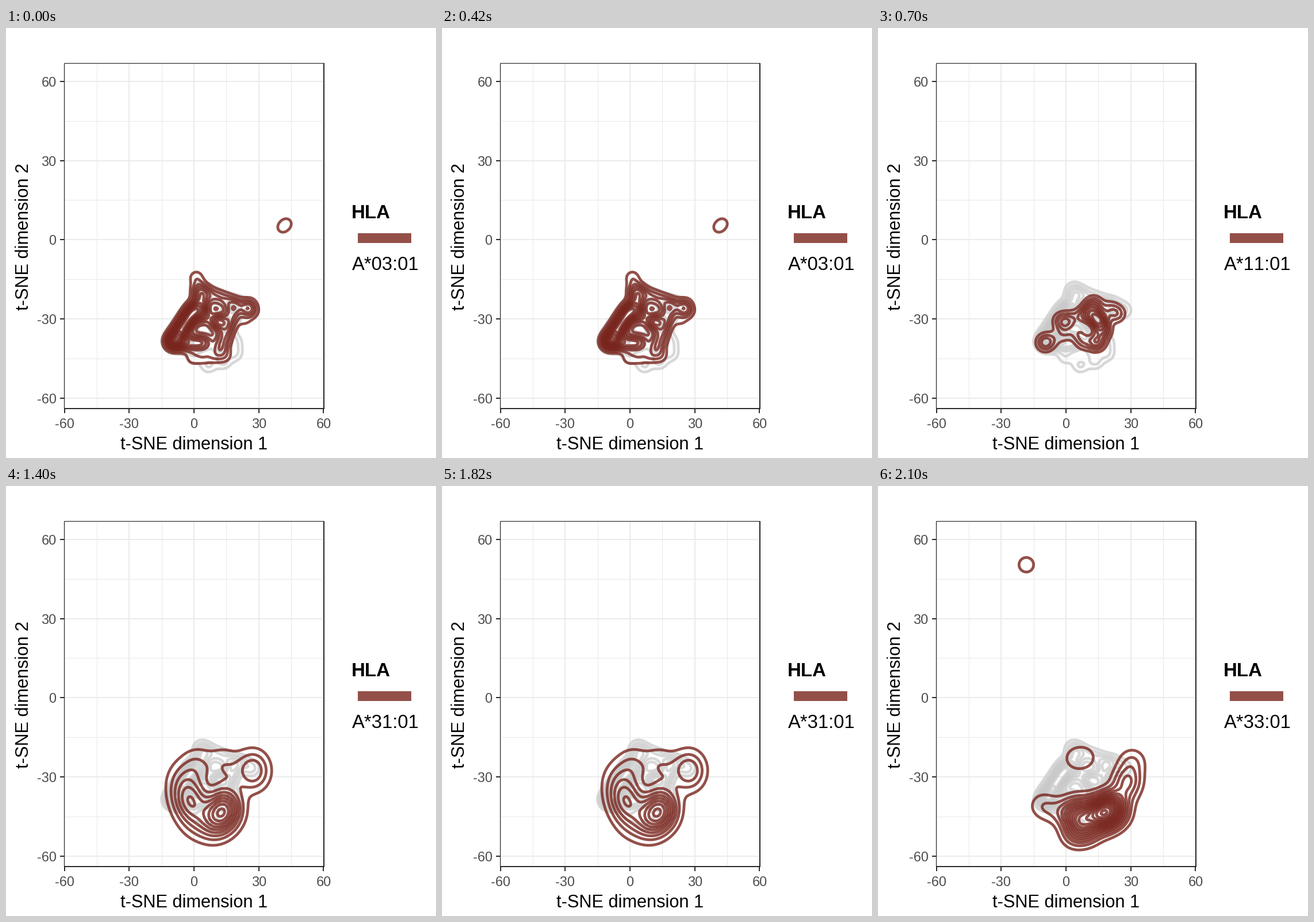
Recreate the animation shown at these times as a matplotlib script. Size 748 by 748 pixels, loop 2.8 s.

```python
import numpy as np
import matplotlib.pyplot as plt
from matplotlib.animation import FuncAnimation
from matplotlib.patches import Rectangle

SIZE, DPI = 748, 68
PT = 72 / DPI  # points per pixel
RED, GREY, GRID, INK = "#78241c", "#c8c8c8", "#ebebeb", "#2b2b2b"
LEFT, RIGHT, TOP, BOTTOM = 101.5, 553, 60.5, 662

plt.rcParams["font.family"] = "Liberation Sans"
plt.rcParams["text.kerning_factor"] = 6
fig = plt.figure(figsize=(SIZE / DPI, SIZE / DPI), dpi=DPI, facecolor="white")
ax = fig.add_axes([0, 0, 1, 1])
ax.set_xlim(0, SIZE)
ax.set_ylim(SIZE, 0)
ax.axis("off")


def px(v):
    return 327 + 3.758 * v


def py(v):
    return 368.4 - 4.596 * v


def rule(xs, ys, color, width, z):
    ax.plot(xs, ys, color=color, lw=width * PT, zorder=z,
            solid_capstyle="butt")


def label(x, y, s, size, color="black", **kw):
    return ax.text(x, y, s, fontsize=size * PT, color=color,
                   va="baseline", zorder=9, **kw)


def panel():
    for v in range(-45, 60, 30):
        rule([px(v)] * 2, [TOP, BOTTOM], GRID, 1.1, 1)
        rule([LEFT, RIGHT], [py(v)] * 2, GRID, 1.1, 1)
    for v in range(-60, 61, 30):
        rule([px(v)] * 2, [TOP, BOTTOM], GRID, 2, 1)
        rule([LEFT, RIGHT], [py(v)] * 2, GRID, 2, 1)
        rule([px(v)] * 2, [BOTTOM, 669.5], INK, 2, 6)
        rule([94, LEFT], [py(v)] * 2, INK, 2, 6)
        label(px(v), 695.5, str(v), 23.5, "#4d4d4d", ha="center")
        label(87.5, py(v) + 9, str(v), 23.5, "#4d4d4d", ha="right")
    rule([LEFT, LEFT], [TOP, BOTTOM + 1], INK, 1.2, 7)
    rule([LEFT, RIGHT], [TOP, TOP], INK, 1.2, 7)
    rule([RIGHT, RIGHT], [TOP, BOTTOM + 1], INK, 2, 7)
    rule([LEFT, RIGHT + 1], [BOTTOM, BOTTOM], INK, 2, 7)
    label(327.5, 733, "t-SNE dimension 1", 30.7, ha="center")
    label(39, 490.5, "t-SNE dimension 2", 30.7, ha="left", rotation=90,
          rotation_mode="anchor")
    label(601, 331, "HLA", 33, weight="bold")
    ax.add_patch(Rectangle((612, 357), 93, 17, color=RED, alpha=0.8, lw=0))


def row(x0, y0, x1, y1, n, h):
    """Evenly spaced bumps of one height along a segment."""
    return [(x, y, h) for x, y in zip(np.linspace(x0, x1, n),
                                      np.linspace(y0, y1, n))]


def contours(bumps, sx, sy, color, alpha, z):
    """Sum Gaussian bumps (x, y, height) and trace every whole level."""
    x = np.arange(0, SIZE + 1, 2.0)
    field = np.zeros((x.size, x.size))
    for bx, by, h in bumps:
        field += h * np.outer(np.exp(-((x - by) / sy) ** 2 / 2),
                              np.exp(-((x - bx) / sx) ** 2 / 2))
    return ax.contour(x, x, field, levels=np.arange(1, int(field.max()) + 1),
                      colors=color, alpha=alpha, linewidths=4.8 * PT, zorder=z)


# Diagonal ridge, bottom band and right-hand arc shared by two densities.
core = (row(292, 544, 328, 489, 7, 4.3) + row(290, 547, 345, 548, 5, 3.2)
        + row(352, 463, 400, 481, 4, 2.2) + row(395, 490, 372, 558, 6, 2.5)
        + [(369, 511, 5.5)])

overall = core + row(340, 456, 342, 500, 4, 2.4) + [
    (427, 491, 2.3), (412, 482, 1.6), (352, 586, 2.1), (378, 580, 2.1),
    (398, 566, 2), (398, 546, 1.8), (326, 572, 1.6)]

# Each density: kernel width, kernel height, bumps.
first = (9.5, 9.5, core + row(337, 455, 342, 500, 4, 3.4)
         + row(325, 574, 380, 570, 4, 1.4)
         + [(331, 434, 1.6), (420, 488, 3.5), (424, 480, 1), (428, 494, 1),
            (415, 510, 0.9), (480, 348, 1.1), (489, 339, 1.1)])

second = (10.5, 10.5, [
    (291, 547, 3.6), (324, 511, 3.4), (314, 508, 0.7), (383, 508, 7),
    (375, 482, 3.4), (370, 496, 3), (360, 500, 2.6), (390, 526, 4),
    (380, 546, 4.4), (358, 545, 2.2), (350, 530, 2.2), (340, 506, 1.6),
    (325, 531, 1.4), (308, 540, 0.8), (415, 497, 2.6), (402, 488, 1.5)])

third = (19.5, 23.8, [
    (382, 561, 6.2), (366, 578, 4), (350, 590, 1), (328, 580, 1.6),
    (321, 548, 4.3), (308, 530, 1.2), (305, 508, 1.3), (332, 488, 1.9),
    (375, 480, 0.85), (384, 493, 1), (430, 495, 3.9)])

fourth = (17, 17, row(404, 556, 380, 568, 2, 7)
          + row(341, 474, 362, 472, 2, 1.1) + [
    (352, 582, 6), (342, 606, 2.5), (335, 568, 3), (350, 555, 1.5),
    (365, 600, 3), (395, 580, 5), (415, 570, 3), (286, 556, 1.6),
    (308, 566, 1), (430, 535, 1.5), (434, 512, 3.4), (442, 480, 2),
    (258, 137, 1.32)])

SCENES = [("A*03:01", first), ("A*11:01", second),
          ("A*31:01", third), ("A*33:01", fourth)]

panel()
contours(overall, 10, 10, GREY, 0.7, 3)
layers = [contours(bumps, sx, sy, RED, 0.8, 4)
          for _, (sx, sy, bumps) in SCENES]
allele = label(601.5, 421, "", 32.8)


def update(i):
    for k, layer in enumerate(layers):
        layer.set_visible(k == i)
    allele.set_text(SCENES[i][0])
    return [allele]


anim = FuncAnimation(fig, update, frames=len(SCENES), interval=700,
                     repeat=True, repeat_delay=0, blit=False)
plt.show()
```
